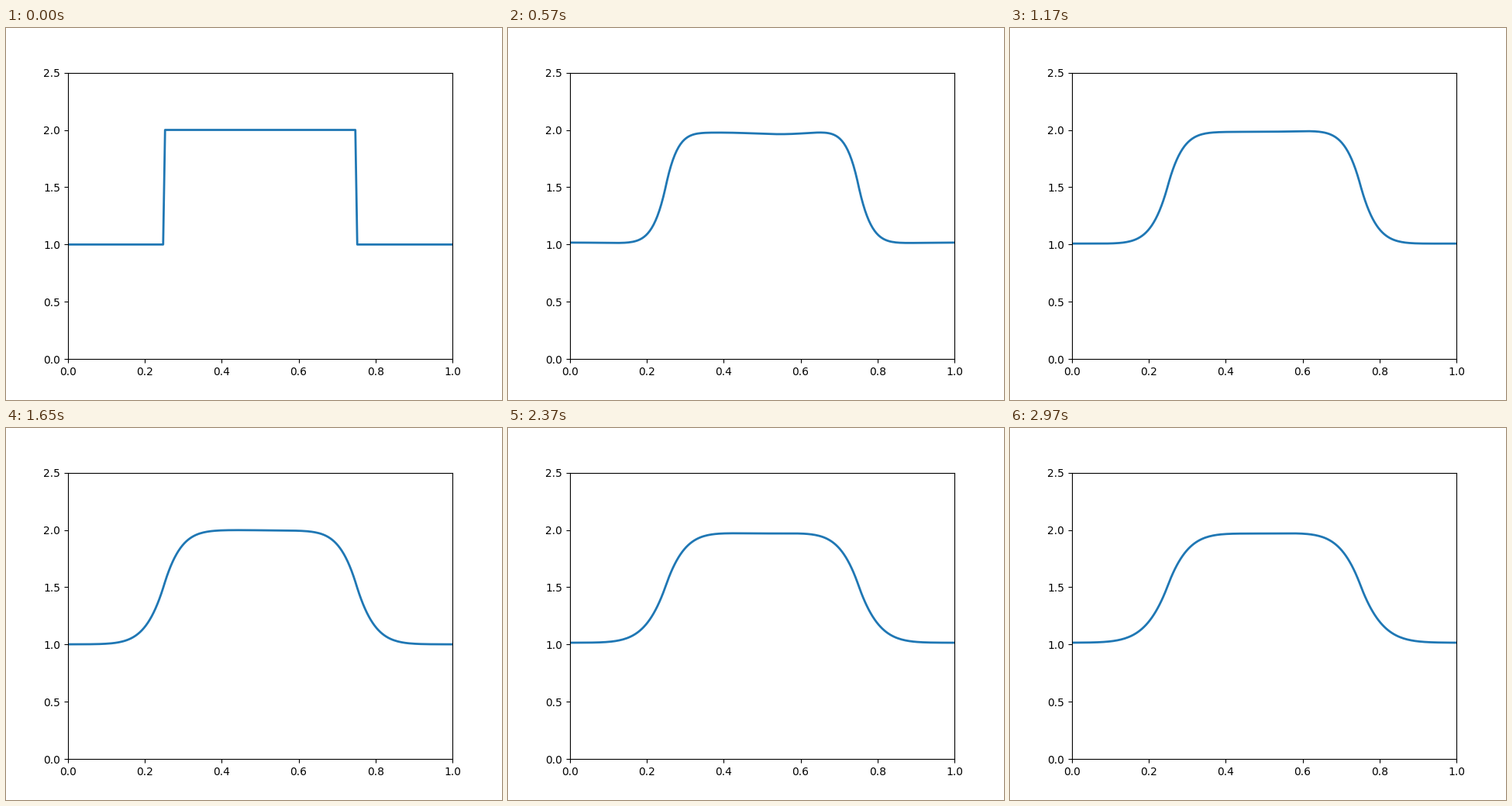
These frames come from a looping animation (640x480 px, 3 s). A matplotlib script:

```python
import numpy as np
import matplotlib.pyplot as plt
from matplotlib.animation import FuncAnimation

FRAMES = 100
CELLS = 200
SPREAD = 0.0133  # front width after one step, grows with the cube root of time
RATIO = 0.92     # the front is narrower inside the slab than outside


def airy(z):
    """Power series of Ai(z), accurate for the small z used here."""
    f, g = np.ones_like(z), z.copy()
    total_f, total_g = f.copy(), g.copy()
    for k in range(1, 60):
        f = f * z**3 / ((3 * k - 1) * (3 * k))
        g = g * z**3 / ((3 * k) * (3 * k + 1))
        total_f += f
        total_g += g
    return 0.355028053887817 * total_f - 0.258819403792807 * total_g


eta = np.linspace(0, 5.5, 1101)
ai = airy(eta)
area = np.concatenate([[0], np.cumsum((ai[1:] + ai[:-1]) / 2)])
area /= area[-1]

x = (np.arange(-1, CELLS + 1) + 0.5) / CELLS


def front(d, width):
    """Unit step at d = 0, smeared by Airy tails that share one slope."""
    middle = 1 / (1 + RATIO)
    rise = np.interp(d / (RATIO * width), eta, area)
    fall = np.interp(-d / width, eta, area)
    return middle + (1 - middle) * rise - middle * fall


def sound(n):
    """Standing sound waves left over from the start."""
    start = 1 - np.exp(-n / 8)
    dip = start * (0.020 + 0.017 * np.cos(2 * np.pi * (n - 89) / 70))
    tilt = 0.009 * start * np.exp(-n / 60) * np.cos(2 * np.pi * (n - 36) / 60)
    ripple = -0.015 * start * np.exp(-n / 17)
    c = np.cos(2 * np.pi * x)
    s = x - 0.5
    inside = (dip * c + tilt * np.sin(4 * np.pi * s)
              + ripple * np.sin(8 * np.pi * s))
    return np.where(c > 0, dip / 2 * c, inside)


def density(n):
    width = max(SPREAD * n ** (1 / 3), 1e-6)
    slab = front(x - 0.25, width) + front(0.75 - x, width) - 1
    return 1 + slab + sound(n)


fig, ax = plt.subplots(figsize=(6.4, 4.8), dpi=100)
ax.set_xlim(0, 1)
ax.set_ylim(0, 2.5)
line, = ax.plot(x, density(0), lw=2)


def update(n):
    line.set_ydata(density(n))
    return line,


anim = FuncAnimation(fig, update, frames=FRAMES, interval=30,
                     repeat=True, repeat_delay=0)
plt.show()
```
